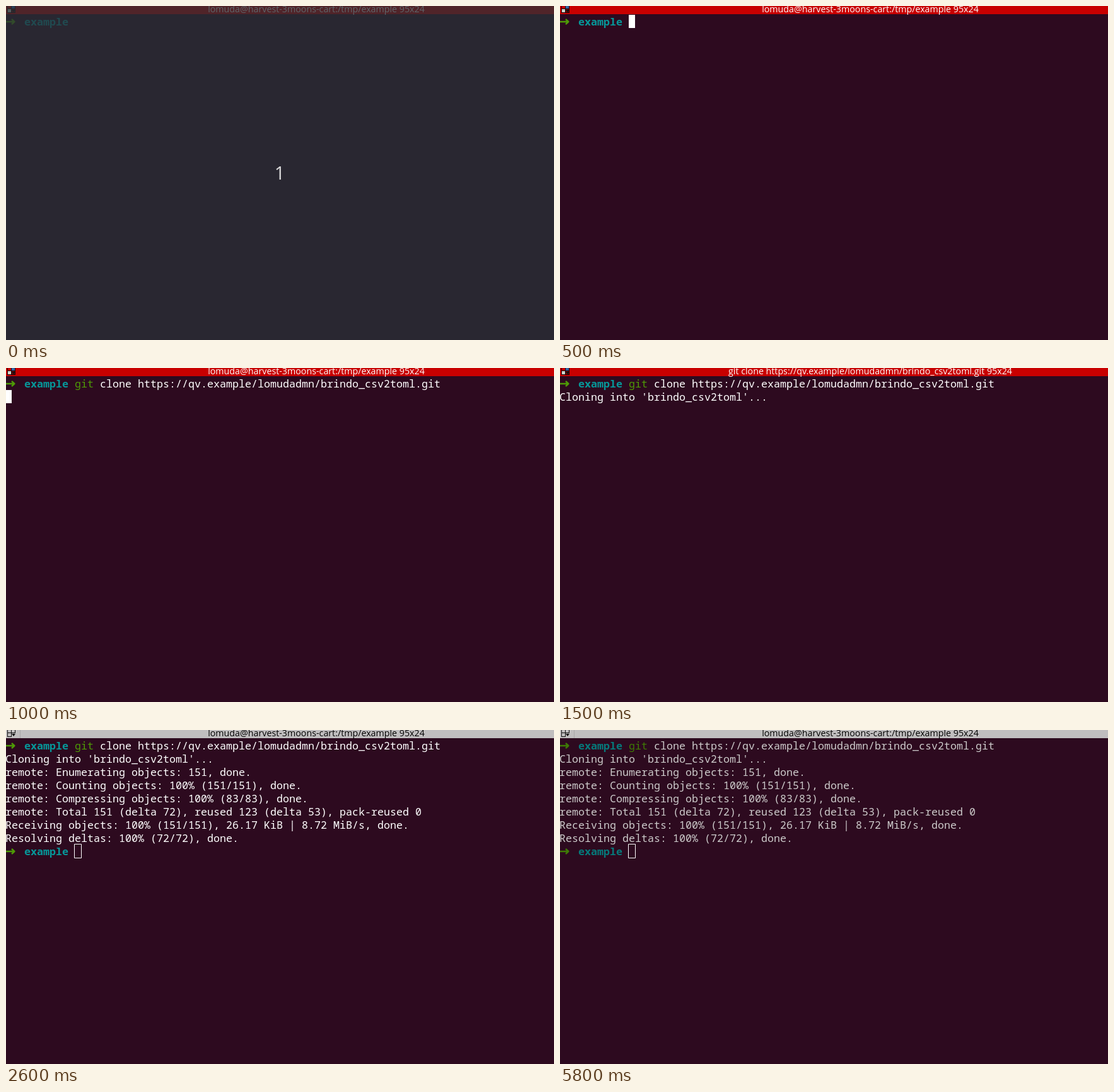
Animation of 869 by 531 pixels, one loop 8 s. Source, as an HTML page with a canvas:

```html
<!DOCTYPE html>
<html lang="en">
<head>
<meta charset="utf-8">
<title>Terminal clone</title>
<style>
html, body { margin: 0; width: 100%; height: 100%; overflow: hidden; background: #2d0a1f; }
canvas { display: block; }
</style>
</head>
<body>
<canvas id="stage" width="869" height="531"></canvas>
<script>
const ctx = document.getElementById('stage').getContext('2d');
const W = 869, H = 531, LOOP = 8000;
const CELL = 10, ROW = 21, LEFT = -1, TOP = 14, BASE = 17;
const MONO = '16.667px "Noto Sans Mono", "DejaVu Sans Mono", monospace';
const SANS = '"Open Sans", "Noto Sans", sans-serif';
const BG = '#2d0a1f';
const BRIGHT = { text: '#ffffff', green: '#4e9a06', teal: '#06989a' };
const DIM = { text: '#cccaca', green: '#3e7b05', teal: '#057a7b' };

const REPO = 'brindo_csv2toml';
const ARGS = ` clone https://qv.example/lomudadmn/${REPO}.git`;
const HOME_TITLE = 'lomuda@harvest-3moons-cart:/tmp/example 95x24';
const GIT_TITLE = `git${ARGS} 95x24`;
const OUTPUT = [
  'remote: Enumerating objects: 151, done.',
  'remote: Counting objects: 100% (151/151), done.',
  'remote: Compressing objects: 100% (83/83), done.',
  'remote: Total 151 (delta 72), reused 123 (delta 53), pack-reused 0',
  'Receiving objects: 100% (151/151), 26.17 KiB | 8.72 MiB/s, done.',
  'Resolving deltas: 100% (72/72), done.'
];

const cellX = col => LEFT + col * CELL;
const rowY = row => TOP + row * ROW;

function rect(x, y, w, h, color) {
  ctx.fillStyle = color;
  ctx.fillRect(x, y, w, h);
}

// Every glyph sits in its own terminal cell.
function print(str, col, row, color, bold) {
  ctx.font = (bold ? 'bold ' : '') + MONO;
  ctx.textAlign = 'left';
  ctx.fillStyle = color;
  [...str].forEach((ch, i) => {
    if (ch !== ' ') ctx.fillText(ch, cellX(col + i), rowY(row) + BASE);
  });
}

function prompt(row, pal) {
  const y = rowY(row) + 11;
  ctx.strokeStyle = pal.green;
  ctx.lineWidth = 2.4;
  ctx.lineJoin = 'round';
  ctx.beginPath();
  ctx.moveTo(0, y);
  ctx.lineTo(13, y);
  ctx.moveTo(9, y - 4);
  ctx.lineTo(13.4, y);
  ctx.lineTo(9, y + 4);
  ctx.stroke();
  print('example', 3, row, pal.teal, true);
}

function cursor(col, row, hollow) {
  const x = cellX(col), y = rowY(row);
  if (hollow) {
    ctx.strokeStyle = '#ffffff';
    ctx.lineWidth = 1;
    ctx.strokeRect(x - 0.5, y - 0.5, CELL + 1, ROW + 1);
  } else {
    rect(x, y, CELL, ROW, '#ffffff');
  }
}

function groupIcon(active) {
  if (active) {
    rect(2, 0, 13, 11, '#140608');
    rect(3, 0, 5, 4, '#c80000');
    rect(9, 0, 5, 4, '#3465a4');
    rect(3, 5, 5, 5, '#d3d7cf');
    rect(9, 5, 5, 5, '#7a0505');
  } else {
    rect(2, 0, 13, 11, '#111111');
    rect(3, 0, 5, 4, '#c0bebf');
    rect(9, 0, 5, 4, '#c0bebf');
    rect(3, 5, 5, 5, '#c0bebf');
    rect(9, 5, 6, 6, '#c0bebf');
    rect(22, 0, 1, 13, '#aaa8a9');
  }
  ctx.fillStyle = '#111111';
  ctx.beginPath();
  ctx.moveTo(9, 6);
  ctx.lineTo(15, 6);
  ctx.lineTo(12, 10);
  ctx.fill();
}

function titleBar(title, active) {
  rect(0, 0, W, 13, active ? '#c80000' : '#c0bebf');
  groupIcon(active);
  ctx.font = '14.25px ' + SANS;
  ctx.textAlign = 'center';
  ctx.fillStyle = active ? '#ffffff' : '#000000';
  ctx.fillText(title, 492, 10);
}

function countdown() {
  rect(0, 0, W, H, 'rgba(41,48,55,0.75)');
  ctx.font = '29px ' + SANS;
  ctx.textAlign = 'center';
  ctx.fillStyle = '#dcdcdc';
  ctx.fillText('1', 434, 276);
}

function command(t, pal) {
  if (t < 1000) {
    rect(cellX(11), rowY(0), 59 * CELL, ROW, '#ffffff');
    print('git' + ARGS, 11, 0, BG);
  } else {
    print('git', 11, 0, pal.green);
    print(ARGS, 14, 0, pal.text);
  }
}

function draw(t) {
  const pal = t < 2700 ? BRIGHT : DIM;
  rect(0, 0, W, H, BG);
  titleBar(t >= 1100 && t < 1900 ? GIT_TITLE : HOME_TITLE, t < 2600);
  prompt(0, pal);

  if (t >= 500 && t < 700) cursor(11, 0);
  if (t >= 700) command(t, pal);
  if (t >= 1000 && t < 1100) cursor(0, 1);
  if (t >= 1100) print(`Cloning into '${REPO}'...`, 0, 1, pal.text);
  if (t >= 1100 && t < 1500) cursor(0, 2);
  if (t >= 1800) OUTPUT.forEach((line, i) => print(line, 0, i + 2, pal.text));
  if (t >= 1900) prompt(8, pal);
  if (t >= 2200) cursor(11, 8, t >= 2600);

  if (t < 100) countdown();
}

const start = performance.now();
function tick() {
  draw((performance.now() - start) % LOOP);
  requestAnimationFrame(tick);
}
tick();
</script>
</body>
</html>
```
